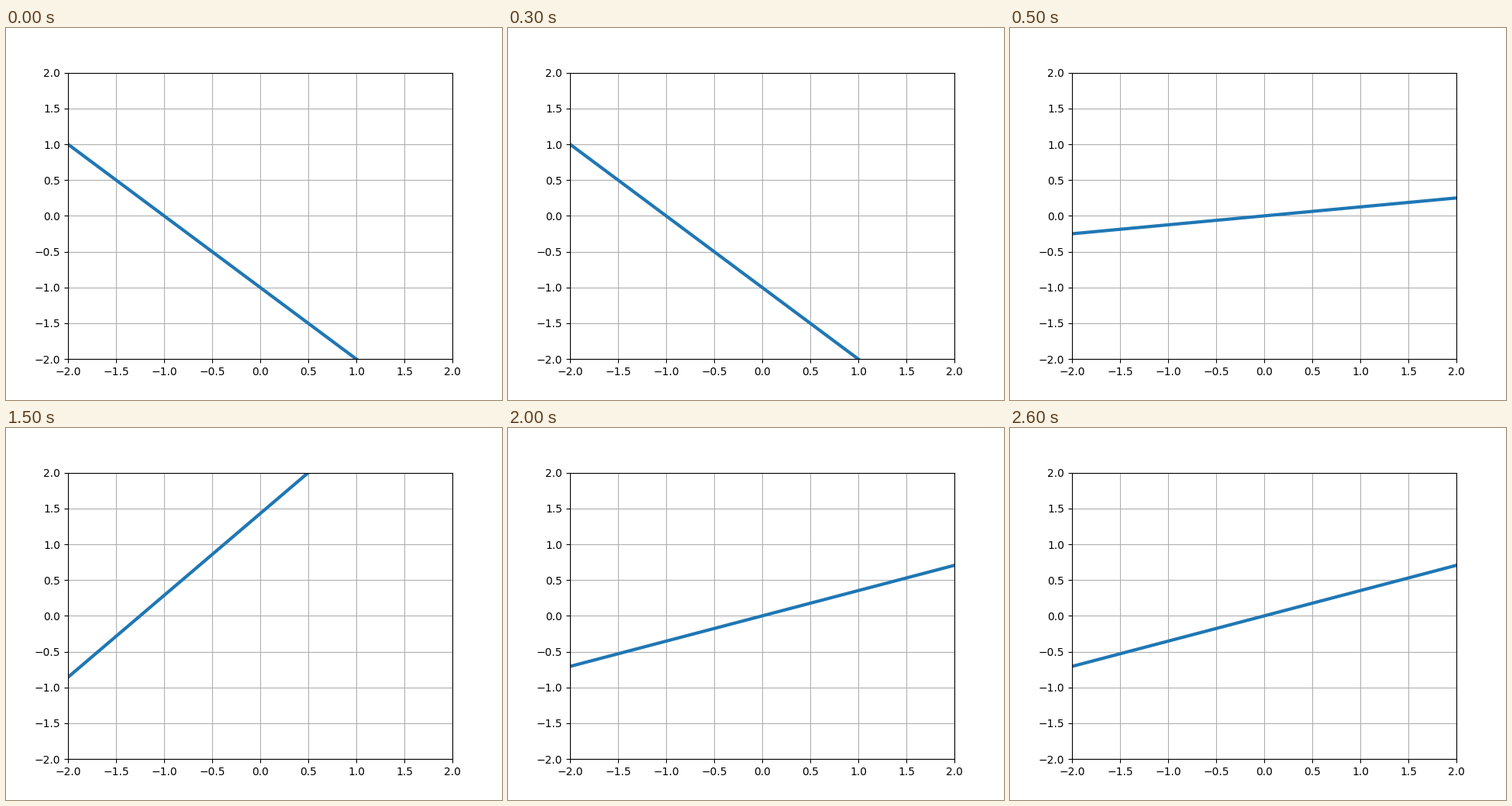
A matplotlib script for the animation above (3000 ms loop, 640 px wide and 480 px high).

```python
import numpy as np
import matplotlib.pyplot as plt
from matplotlib.animation import FuncAnimation

LIMIT = 2
STEP_MS = 500

# Decision boundaries as (slope, intercept), one per step
BOUNDARIES = [
    (-1, -1),
    (1 / 8, 0),
    (1 / 8, 0),
    (8 / 7, 10 / 7),
    (6 / 17, 0),
    (6 / 17, 0),
]

fig, ax = plt.subplots(figsize=(6.4, 4.8), dpi=100)
ax.set_xlim(-LIMIT, LIMIT)
ax.set_ylim(-LIMIT, LIMIT)
ax.grid(True)

x = np.array([-LIMIT, LIMIT])
line, = ax.plot([], [], color="tab:blue", lw=3)


def update(step):
    slope, intercept = BOUNDARIES[step]
    line.set_data(x, slope * x + intercept)
    return line,


anim = FuncAnimation(fig, update, frames=len(BOUNDARIES),
                     interval=STEP_MS, repeat=True, repeat_delay=0)
plt.show()
```
